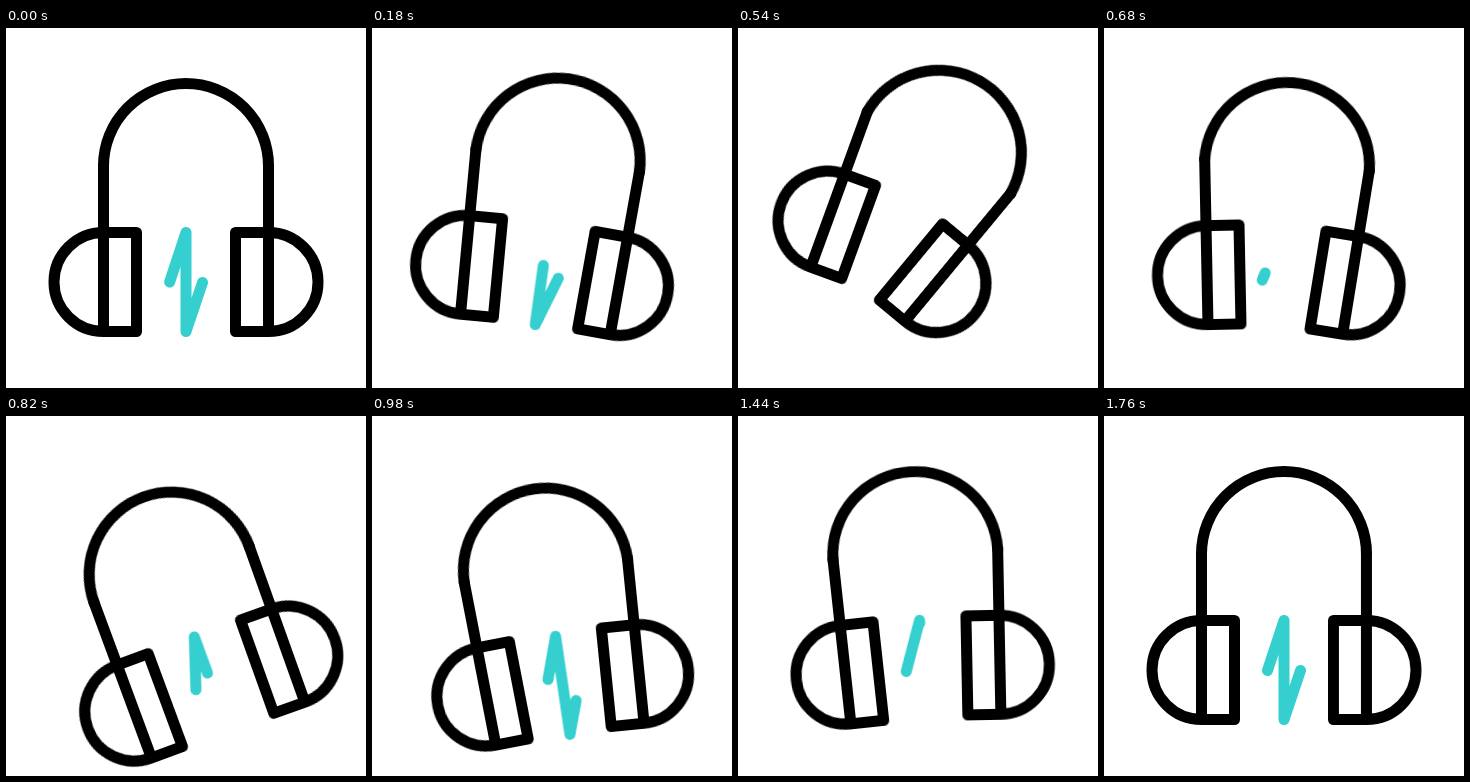
Write an HTML page that moves like this. It is 360 by 360 pixels and loops after 2.4 s.

```html
<!DOCTYPE html>
<html lang="en">
<head>
<meta charset="utf-8">
<title>Headphones</title>
<style>
  html, body { margin: 0; width: 100%; height: 100%; overflow: hidden; background: #fff; }
  svg { display: block; width: 100vw; height: 100vh; }

  path {
    fill: none;
    stroke: #000;
    stroke-width: 11;
    stroke-linecap: round;
    stroke-linejoin: round;
  }

  .lift, .tilt, .cup {
    animation: 2400ms cubic-bezier(.37, 0, .63, 1) infinite;
  }
  .lift { animation-name: lift; }
  .tilt { animation-name: tilt; transform-origin: 180px 180px; }
  .cup  { animation-name: pinch; transform-origin: 97.5px 138px; }

  .bolt {
    stroke: #34cfce;
    animation: trim 2400ms linear infinite, blink 2400ms step-end infinite;
  }

  @keyframes lift {
    0%, 51.67%, 100% { transform: translateY(0); }
    20.83% { transform: translateY(-20px); }
    36.46% { transform: translateY(20px); }
  }

  @keyframes tilt {
    0%, 72.92%, 100% { transform: rotate(0deg); }
    22.08% { transform: rotate(30deg); }
    34.38% { transform: rotate(-20deg); }
    49.38% { transform: rotate(9.5deg); }
    61.25% { transform: rotate(-4deg); }
  }

  @keyframes pinch {
    0%, .83%, 35.88%, 64.96%, 100% { transform: rotate(0deg); }
    21.25%, 50.42% { transform: rotate(-10deg); }
  }

  /* The bolt is wiped from its start, then drawn again, twice. */
  @keyframes trim {
    0% { stroke-dasharray: 100 300; stroke-dashoffset: 0; }
    16.667% { stroke-dasharray: 0 300; stroke-dashoffset: -100; }
    16.668%, 27.833% { stroke-dasharray: 0 300; stroke-dashoffset: 0; }
    40.208% { stroke-dasharray: 86.8 300; stroke-dashoffset: 0; }
    42.083% { stroke-dasharray: 87.7 300; stroke-dashoffset: -12.3; }
    55.417% { stroke-dasharray: 0 300; stroke-dashoffset: -100; }
    55.418%, 56% { stroke-dasharray: 0 300; stroke-dashoffset: 0; }
    70.833%, 100% { stroke-dasharray: 100 300; stroke-dashoffset: 0; }
  }

  @keyframes blink {
    0%, 27.833%, 56%, 100% { opacity: 1; }
    16.667%, 55.417% { opacity: 0; }
  }
</style>
</head>
<body>
<svg viewBox="0 0 360 360">
  <g class="lift">
    <g class="tilt">
      <path d="M97.5 138A82.5 82.5 0 0 1 262.5 138"/>
      <g class="cup">
        <path d="M97.5 138V303.5M97.5 204.5H130.5V303.5H97.5A49.5 49.5 0 0 1 97.5 204.5"/>
      </g>
      <g transform="translate(360) scale(-1 1)">
        <g class="cup">
          <path d="M97.5 138V303.5M97.5 204.5H130.5V303.5H97.5A49.5 49.5 0 0 1 97.5 204.5"/>
        </g>
      </g>
      <path class="bolt" pathLength="100" d="M163.5 254.5L180 204.5V303.5L196.5 254.5"/>
    </g>
  </g>
</svg>
</body>
</html>
```
